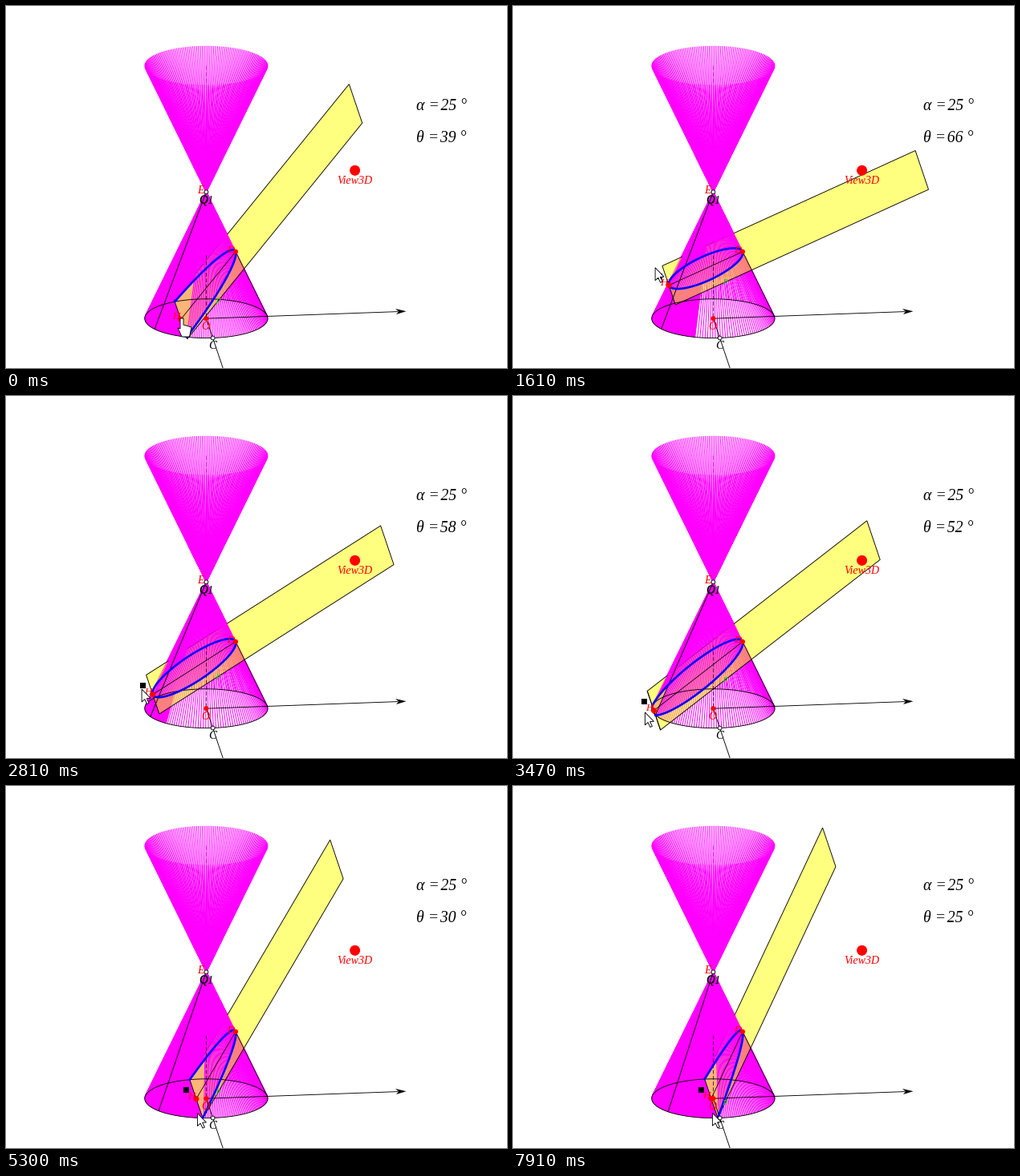
Recreate the animation shown at these times as a matplotlib script. Size 624 by 452 pixels, loop 8 s.

```python
import numpy as np
import matplotlib.pyplot as plt
from matplotlib.animation import FuncAnimation
from matplotlib.collections import LineCollection
from matplotlib.patches import Circle, Polygon
from matplotlib.path import Path

W, H, DPI = 624, 452, 64
PX = 72 / DPI  # points per pixel
STEP = 40
FRAMES = 8000 // STEP

MAGENTA, RED, BLUE = "#ff00ff", "#ff0000", "#0000ff"
APEX = np.array([249.4, 232.2])
EX = np.array([76.2, -2.6])
EY = np.array([8.2, 24.3])
DEPTH = np.array([0.0, 158.0])
BASE = APEX + DEPTH
SD = 0.48                     # depth of the fixed point on the cone
COT = 1 / np.tan(np.radians(25))
PLANE_LEN = 346.5
LEFT, RIGHT = 195, -3         # rim angles of the cone's outline

# the plane is dragged in bursts of equal ticks: start, number of ticks
TICK = 134
BURSTS = [(140, 30), (4840, 13), (7540, 2)]
RELEASE = 140 + 30 * TICK

# time and plane angle at the turning points of the drag
THETA_KEYS = [(0, 38.8), (676, 54.2), (1080, 52.2), (1614, 66.4), (1880, 69),
              (2820, 58), (3350, 52.6), (4160, 31.7), (4840, 31.4),
              (6180, 26.7), (6582, 25.9), (7540, 25.6), (7808, 24.7)]


def held_time(now):
    """Time of the last tick at which the plane moved."""
    t = 0
    for start, n in BURSTS:
        if now >= start:
            t = start + TICK * min((now - start) // TICK, n)
    return t


def proj(x, y, s):
    """Cone coordinates (radius units, depth s below the apex) to pixels."""
    x, y, s = (np.asarray(v, float)[..., None] for v in (x, y, s))
    return APEX + x * EX + y * EY + s * DEPTH


def rim(deg, s=1):
    a = np.radians(deg)
    return proj(np.cos(a), np.sin(a), s + 0 * a)


def spread(n):
    return LEFT - np.arange(n) * 360 / n


def rays(deg, s=1):
    ends = rim(deg, s)
    return np.stack([np.broadcast_to(APEX, ends.shape), ends], axis=1)


fig = plt.figure(figsize=(W / DPI, H / DPI), dpi=DPI, facecolor="white")
ax = fig.add_axes([0, 0, 1, 1])
ax.set_xlim(0, W)
ax.set_ylim(H, 0)
ax.axis("off")


def line(pts=((0, 0),), color="k", w=0.9, z=5, **kw):
    pts = np.asarray(pts, float)
    return ax.plot(pts[:, 0], pts[:, 1], color=color, lw=w * PX, zorder=z, **kw)[0]


def poly(pts=((0, 0), (0, 1), (1, 0)), fc="k", ec="none", w=0.9, z=5):
    return ax.add_patch(Polygon(np.asarray(pts, float), closed=True, fc=fc, ec=ec,
                                lw=w * PX, zorder=z))


def dot(x, y, r=2.6, fc=RED, ec=RED, z=9):
    return ax.add_patch(Circle((x, y), r, fc=fc, ec=ec, lw=0.9 * PX, zorder=z))


def label(x, y, s, size=14, color=RED, ha="center", va="center", z=8):
    return ax.text(x, y, s, fontsize=size * PX, color=color, ha=ha, va=va, zorder=z,
                   family="Liberation Serif", style="italic")


def hatch(z):
    return ax.add_collection(LineCollection([], colors=MAGENTA, linewidths=PX, zorder=z))


# fixed parts
hatch(2).set_segments(rays(spread(200), -1))
line([APEX - DEPTH, APEX - 0.6 * DEPTH], z=1.9, dashes=(6, 3))
line([APEX + 0.5 * DEPTH, BASE], "#300030", 0.8, 4.8, dashes=(6, 3))
line(rim(np.linspace(0, 360, 181)))
line([BASE, (488, 381.6)])
poly([(498.5, 381.2), (485, 378), (489, 381.5), (486, 385)])
line([BASE, (270.5, 453)])

D = proj(SD, 0, SD)
line([D, rim(0.0)], w=0.8)
dot(*D)
dot(*BASE)
dot(*APEX, r=2.4, fc="white", ec="k")
dot(*proj(0, 1, 1), r=2.4, fc="white", ec="k")
dot(434.6, 205.3, r=6)
label(434, 218, "View3D")
label(242, 231, "E")
label(248, 401, "O")
label(280, 305, "D", 13)
label(257, 425, "C", 15, "k")
label(249, 243, "Q1", 15, "k")
label(246, 242, "O", 15, "k")
READOUT = "%s =\u200a%d °"
label(511, 129.5, READOUT % ("α", 25), 19.8, "k", "left", "baseline")
theta_text = label(511, 169.5, "", 19.8, "k", "left", "baseline")

# moving parts
low_hatch, up_hatch = hatch(2), hatch(4.4)
low_fan, up_fan = poly(fc=MAGENTA, z=2.1), poly(fc=MAGENTA, z=4.1)
plane = poly(fc=(1, 1, 0, 0.5), ec="k", z=3)
section = poly(fc="#ffb478", z=4.3)
chord = line(z=4.5)
axis_line = line(w=0.8, z=4.6)
side = line(z=4.7)
curve = line(color=BLUE, w=2.6, z=6)
point = dot(0, 0, r=3)
point_label = label(0, 0, "H", 13)
green = label(0, 0, "p", 11, "#20d020", z=7)
handle = poly(z=9)
SQUARE = 3.5 * np.array([(-1, -1), (1, -1), (1, 1), (-1, 1)])
ARROW = np.array([(0, 0), (0, 16), (3.7, 12.6), (6.5, 18.6), (9, 17.4),
                  (6.2, 11.6), (11, 11.4)])
HAND = np.array([(-2, 0), (2, 0), (2, 8), (12, 11), (9.5, 23), (0, 23), (-5, 12), (-2, 13)])
cursor = poly(fc="white", ec="k", z=10)


def set_line(art, pts):
    art.set_data(*np.asarray(pts).T)


def arm(k, s_end, sign):
    """One branch of the conic, from the fixed point down to depth s_end."""
    s = SD + (s_end - SD) * (1 - np.cos(np.linspace(0, np.pi, 70))) / 2
    x = SD - k * (s - SD)
    return proj(x, sign * np.sqrt(np.maximum(s * s - x * x, 0)), s)


def draw(i):
    t = held_time(i * STEP + STEP - 5)
    theta = np.interp(t, *np.transpose(THETA_KEYS))
    k = np.tan(np.radians(theta)) * COT
    s_h = SD * (1 + k) / (k - 1) if k > 1.01 else 9
    closed = s_h < 1
    s_end = min(s_h, 1)
    h = proj(SD - k * (s_end - SD), 0, s_end)

    # plane strip
    u = (D - h) / np.hypot(*(D - h))
    far = h + PLANE_LEN * u
    plane.set_xy([h - EY, far - EY, far + EY, h + EY])
    chord.set_visible(not closed)
    set_line(chord, [h - EY, h + EY])
    set_line(axis_line, [h, D])

    # solid part of the lower cone, left of the last ray under the plane
    x_edge = -1 + 2.2 * (1 - s_h) if closed else SD - k * (1 - SD)
    edge = np.degrees(np.arccos(x_edge))
    arc = rim(np.linspace(LEFT, edge, 50))
    front, back = arm(k, s_end, 1), arm(k, s_end, -1)
    above = [front[::-1]] if closed else [arc, front[::-1]]
    for fan in (low_fan, up_fan):
        fan.set_xy(np.vstack([APEX, arc]))
    section.set_xy(np.vstack([back[::-1], front]))

    # rays, with those in front of the plane drawn again above it
    deg = spread(int(150 + 4 * max(53 - theta, 0)))
    low_hatch.set_segments(rays(deg))
    up_hatch.set_segments(rays(deg[(deg > RIGHT) & (deg < (LEFT + 1 if closed else edge))]))
    for art in (up_fan, up_hatch):
        art.set_clip_path(Path(np.vstack([APEX] + above)), ax.transData)

    s_curve = 1.51 if t == RELEASE else s_end
    set_line(curve, np.vstack([arm(k, s_curve, -1)[::-1], arm(k, s_curve, 1)]))
    foot = (177 + 0.57 * abs(theta - 53) - BASE[0]) / 76.6
    set_line(side, [APEX, BASE + (76.6 * foot, 24.4 * np.sqrt(1 - foot ** 2))])

    # labels and pointer
    point.center = h
    point_label.set_position(h + (-6, -3))
    low = h + EY
    green.set_position((264, low[1] + (264 - low[0]) * u[1] / u[0] - 1))
    theta_text.set_text(READOUT % ("θ", round(theta)))
    handle.set_visible(t > 0)
    handle.set_xy(h + (-12, -11) + SQUARE)
    grip = [np.interp(theta, (32, 54, 66), v) for v in ((1.5, -12, -17), (18, 1, -22))]
    cursor.set_xy(h + grip + ARROW if t > 0 else HAND + (219, 390))
    return []


anim = FuncAnimation(fig, draw, frames=FRAMES, interval=STEP, init_func=lambda: draw(0),
                     repeat=True, repeat_delay=0, blit=False)
plt.show()
```
